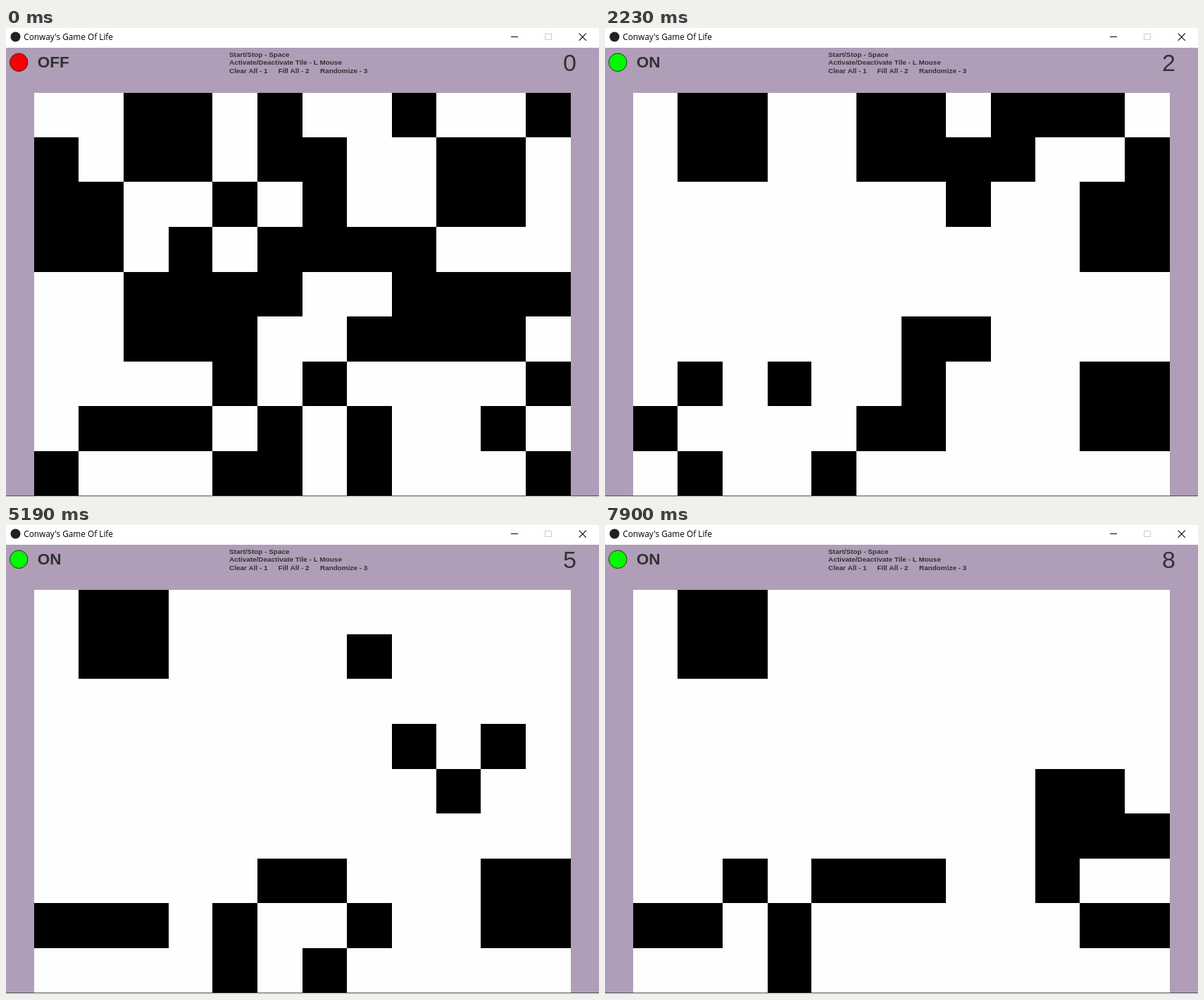
An HTML page for the animation above (8 s loop, 842 by 665 pixels).

```html
<!DOCTYPE html>
<html lang="en">
<head>
<meta charset="utf-8">
<title>Conway's Game Of Life</title>
<style>
  html, body { margin: 0; width: 100%; height: 100%; overflow: hidden; background: #fff; }
  svg { display: block; width: 842px; height: 665px; }
  text { font-family: "Liberation Sans", Arial, sans-serif; fill: #323232; font-kerning: none; white-space: pre; }
  .title { font: 11.8px "Open Sans", "Noto Sans", sans-serif; fill: #000; }
  .help { font-size: 9.93px; font-weight: bold; }
  .state { font-size: 22.5px; font-weight: bold; }
  .count { font-size: 34px; text-anchor: middle; }
</style>
</head>
<body>
<svg viewBox="0 0 842 665">
  <rect width="842" height="665" fill="#fff"/>
  <circle cx="13.5" cy="12.5" r="7" fill="#222"/>
  <text class="title" x="25.3" y="17.3">Conway's Game Of Life</text>
  <g fill="none" stroke="#000">
    <path d="M717 12.5H727"/>
    <rect x="765.5" y="8.5" width="9" height="8" stroke="#ccc"/>
    <path d="M813.7 7.7L823.8 17.8M823.8 7.7L813.7 17.8" stroke-width="1.1"/>
  </g>

  <rect y="28" width="842" height="635" fill="#b09eb8"/>
  <circle id="lamp" cx="18.2" cy="48.7" r="12.8" stroke="#322832" stroke-width="1"/>
  <text id="state" class="state" x="44.8" y="56.2"></text>
  <g class="help">
    <text x="317" y="40.7">Start/Stop - Space</text>
    <text x="317" y="52.2">Activate/Deactivate Tile - L Mouse</text>
    <text x="317" y="63.8">Clear All - 1</text>
    <text x="386.5" y="63.8">Fill All - 2</text>
    <text x="446" y="63.8">Randomize - 3</text>
  </g>
  <text id="count" class="count" x="800.5" y="60.6"></text>

  <rect x="40" y="92" width="762" height="571" fill="#fefefe"/>
  <path id="cells" fill="#000" shape-rendering="crispEdges"/>
  <rect y="663" width="842" height="1" fill="#4c484e"/>
</svg>
<script>
const LOOP = 8000, START = 210;
const countTimes = [920, 1920, 2930, 3950, 4960, 5970, 6960, 7900];
const gridTimes = [1220, 2230, 3250, 4250, 5190, 6200, 7210];
const xs = [40, 103, 167, 231, 293, 357, 421, 484, 548, 611, 674, 738, 802];
const ys = [92, 155, 218, 282, 346, 409, 473, 536, 600, 663];
const seed = [
  "..##.#..#..#",
  "#.##.##..##.",
  "##..#.#..##.",
  "##.#.####...",
  "..####..####",
  "..###..####.",
  "....#.#....#",
  ".###.#.#..#.",
  "#...##.#...#"
].map(row => [...row].map(c => c === "#" ? 1 : 0));

function neighbours(grid, r, c) {
  let n = -grid[r][c];
  for (let y = r - 1; y <= r + 1; y++)
    for (let x = c - 1; x <= c + 1; x++) n += grid[y]?.[x] || 0;
  return n;
}

function step(grid) {
  return grid.map((row, r) => row.map((alive, c) => {
    const n = neighbours(grid, r, c);
    return n === 3 || (alive && n === 2) ? 1 : 0;
  }));
}

function outline(grid) {
  let d = "";
  grid.forEach((row, r) => row.forEach((alive, c) => {
    if (alive) d += `M${xs[c]} ${ys[r]}H${xs[c + 1]}V${ys[r + 1]}H${xs[c]}Z`;
  }));
  return d;
}

const paths = [];
for (let g = seed, i = 0; i <= gridTimes.length; i++, g = step(g)) paths.push(outline(g));

const el = id => document.getElementById(id);
const lamp = el("lamp"), state = el("state"), count = el("count"), cells = el("cells");
const passed = (times, t) => times.filter(x => x <= t).length;

function draw(t) {
  const on = t >= START;
  lamp.setAttribute("fill", on ? "#00fa00" : "#fa0000");
  state.textContent = on ? "ON" : "OFF";
  count.textContent = passed(countTimes, t);
  cells.setAttribute("d", paths[passed(gridTimes, t)]);
}

const t0 = performance.now();
function frame(now) {
  draw(Math.max(0, now - t0) % LOOP);
  requestAnimationFrame(frame);
}
draw(0);
requestAnimationFrame(frame);
</script>
</body>
</html>
```
